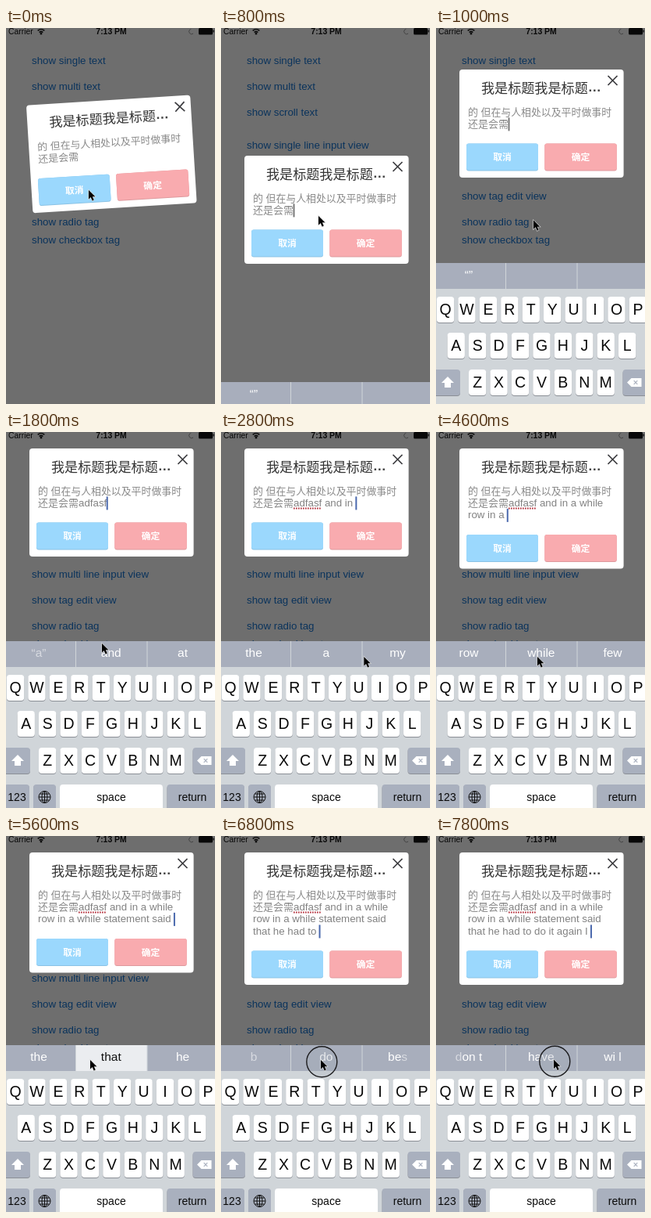
These frames come from a looping animation (268x480 px, 8 s). An HTML page with a canvas:

```html
<!DOCTYPE html>
<html lang="en">
<head>
<meta charset="utf-8">
<style>
html, body { margin: 0; width: 100%; height: 100%; overflow: hidden; background: #6e6e6e; }
canvas { display: block; width: 100vw; height: 100vh; }
</style>
</head>
<body>
<canvas id="stage" width="268" height="480"></canvas>
<script>
const ctx = document.getElementById("stage").getContext("2d");
const LATIN = '"Liberation Sans", Arial, sans-serif';
const CJK = '"Noto Sans CJK SC", "Noto Sans CJK", sans-serif';
const LOOP = 8000, TICK = 200;

const menu = [
  [42, "show single text"], [75, "show multi text"], [108, "show scroll text"],
  [150, "show single line input view"], [182.5, "show multi line input view"],
  [215, "show tag edit view"], [248, "show radio tag"], [271, "show checkbox tag"]
];

// time, text added, suggestions (dim|bright|dim), pressed cell, tap ring
const script = [
  [0, "", "“”//"],
  [1600, "ad", "“a”/and/at"],
  [1800, "fasf", "“a”|/and/at"],
  [2000, " ", "I/and/the"],
  [2200, "", "I/and/the", 1, true],
  [2400, "and ", "the/I/in"],
  [2600, "", "the/I/in", 2, true],
  [2800, "in ", "the/a/my"],
  [3200, "", "the/a/my", 1, true],
  [3400, "a ", "few/while/row"],
  [3600, "", "st|ateen|t/while/r|oy|"],
  [3800, "while ", "and/I/row"],
  [4000, "row ", "and/in/of"],
  [4200, "", "and/in/of", 1, true],
  [4400, "in ", "the/a/my"],
  [4600, "a ", "row/while/few"],
  [4800, "while ", "statement/and/I"],
  [5000, "", "statement/and/I", 0],
  [5200, "statement ", "said/that/is"],
  [5400, "said ", "the/that/he"],
  [5600, "", "the/that/he", 1],
  [5800, "that ", "the/he/I"],
  [6000, "he ", "is/had/was"],
  [6200, "", "is/had/was", -1, true],
  [6400, "had ", "a/to/been"],
  [6600, "to ", "b/do/be"],
  [6800, "", "b|/do/|be|s", -1, true],
  [7000, "do ", "it/it/so"],
  [7200, "it ", "to/again/and"],
  [7400, "again ", "and/I/the"],
  [7600, "I ", "don’t/have/will"],
  [7800, "", "d|on t|/have/wi l", -1, true]
];

const keys = {
  pointer: [[0, 106, 207], [800, 125, 240], [1400, 125, 256], [1800, 123, 270], [2200, 131, 285],
    [2600, 200, 287], [3200, 150, 287], [3600, 178, 288], [4000, 160, 287], [4600, 130, 287],
    [5000, 60, 287], [5600, 108, 286], [6200, 130, 286], [6800, 128, 286], [7800, 151, 285.5]],
  // centre height and tilt of the two-line dialog
  dialog: [[0, 161, -3.55], [200, 216, -.8], [400, 232, 0], [800, 232, 0], [1000, 122, 0], [1200, 90, 0]],
  keyboard: [[0, 484], [600, 484], [800, 452], [1000, 300], [1200, 267]]
};

function sample(track, t) {
  const i = track.findIndex(k => k[0] > t);
  if (i < 0) return track[track.length - 1].slice(1);
  const a = track[i - 1], b = track[i], p = (t - a[0]) / (b[0] - a[0]);
  return a.slice(1).map((v, n) => v + (b[n + 1] - v) * p);
}

function text(str, x, y, size, color, align = "left", font = LATIN, weight = "") {
  ctx.font = `${weight} ${size}px ${font}`;
  ctx.textAlign = align;
  ctx.textBaseline = "middle";
  ctx.fillStyle = color;
  ctx.fillText(str, x, y);
  return ctx.measureText(str).width;
}

function box(x, y, w, h, r, color) {
  ctx.fillStyle = color;
  ctx.beginPath();
  ctx.roundRect(x, y, w, h, r);
  ctx.fill();
}

function line(points, color, width, closed) {
  ctx.beginPath();
  points.forEach(p => ctx.lineTo(...p));
  if (closed) ctx.closePath();
  ctx.strokeStyle = color;
  ctx.lineWidth = width;
  ctx.stroke();
}

function polygon(points, color) {
  ctx.beginPath();
  points.forEach(p => ctx.lineTo(...p));
  ctx.fillStyle = color;
  ctx.fill();
}

function cross(x, y, r, color, width) {
  line([[x - r, y - r], [x + r, y + r]], color, width);
  line([[x + r, y - r], [x - r, y + r]], color, width);
}

function arc(x, y, r, from = 0, to = Math.PI * 2) {
  ctx.beginPath();
  ctx.arc(x, y, r, from, to);
}

function drawStatusBar() {
  const ink = "#080808";
  text("Carrier", 3, 5.2, 10.4, ink);
  text("7:13 PM", 135, 5.2, 10.4, ink, "center", LATIN, "bold");
  ctx.strokeStyle = ink;
  ctx.lineWidth = 1.6;
  for (const r of [3.5, 6.5]) { arc(45, 8.2, r, -2.3, -.84); ctx.stroke(); }
  ctx.fillStyle = ink;
  arc(45, 7.2, 1.3);
  ctx.fill();
  ctx.strokeStyle = "#444";
  ctx.lineWidth = 1;
  arc(238, 4.5, 3.3, .9, 4.5);
  ctx.stroke();
  box(247, 0, 18, 8.5, 1.5, ink);
  box(265.5, 2.5, 1.3, 3, .5, ink);
}

function layoutWords(typed) {
  const words = typed.match(/\S+\s*/g) || [];
  const placed = [];
  let x = 63, row = 1;
  ctx.font = `13.3px ${LATIN}`;
  for (const word of words) {
    if (x + ctx.measureText(word.trim()).width > 196) { x = 11; row++; }
    placed.push({ word, x, row });
    x += ctx.measureText(word).width;
  }
  return { placed, x, row };
}

function drawButton(x, y, w, color, edge, label) {
  box(x, y, w, 35, 3, edge);
  box(x, y, w, 34, 3, color);
  text(label, x + w / 2, y + 17.5, 11.8, "#fff", "center", CJK, "bold");
}

function drawDialog(t, typed) {
  const [cy, tilt] = sample(keys.dialog, t);
  const { placed, x, row } = layoutWords(typed);
  const extra = (row - 1) * 15.5;
  const lineY = n => 54.4 + n * 15.5;
  ctx.save();
  ctx.translate(135, cy);
  ctx.rotate(tilt * Math.PI / 180);
  ctx.translate(-105, -69);
  box(0, 0, 210.6, 138 + extra, 4, "#fff");

  const width = text("我是标题我是标题", 28, 23.2, 17.1, "#333", "left", CJK);
  text("…", 28 + width, 23.2, 17.1, "#444", "left", LATIN, "bold");
  cross(196.5, 14, 6, "#3c3c40", 1.7);

  const gray = "#8a8a8a";
  text("的", 11, lineY(0) - .5, 13, gray, "left", CJK);
  text("但在与人相处以及平时做事时", 27.5, lineY(0) - .5, 12.9, gray, "left", CJK);
  text("还是会需", 11, lineY(1) - .5, 13, gray, "left", CJK);
  for (const p of placed) text(p.word, p.x, lineY(p.row), 13.3, "#828282");
  if (typed.includes(" ")) {
    ctx.setLineDash([1.7, 1.3]);
    line([[63, 76.5], [99, 76.5]], "#b5323e", 2);
    ctx.setLineDash([]);
  }
  if (t >= 600) box(x - .5, lineY(row) - 8.5, 2, 17, 0, typed ? "#4a68ad" : "#777");

  drawButton(9, 94.4 + extra, 92, "#9bd8fd", "#8bc3e5", "取消");
  drawButton(109.3, 94.4 + extra, 92.5, "#f9abaf", "#dd9a9e", "确定");
  ctx.restore();
}

function drawKey(x, y, w, label, size, color = "#fff") {
  box(x, y + 1, w, 33, 4, "#8b8f96");
  box(x, y, w, 33, 4, color);
  text(label, x + w / 2, y + 17.2, size, "#0a0a0a", "center");
}

function drawSuggestion(spec, index, pressed) {
  const left = [0, 90, 181.5][index], width = [89, 91, 87][index];
  if (pressed) box(left, 0, width, 33, 0, "#ebedf0");
  const parts = spec.split("|");
  ctx.font = `15.5px ${LATIN}`;
  let x = [42, 134.8, 226.5][index] - ctx.measureText(parts.join("")).width / 2;
  parts.forEach((part, n) => {
    const dim = parts.length === 3 ? n !== 1 : parts.length === 2;
    const color = pressed ? "#111" : dim ? "rgba(255,255,255,.55)" : "#fff";
    x += text(part, x, 15.7, 15.5, color, "left");
  });
}

function drawKeyboard(top, suggestions, pressed) {
  const dark = "#a9b0be";
  ctx.save();
  ctx.translate(0, top);
  box(0, 0, 268, 220, 0, "#d0d5d9");
  box(0, 0, 268, 33, 0, "#a8aebc");
  suggestions.split("/").forEach((s, i) => drawSuggestion(s, i, i === pressed));
  for (const x of [89, 180.5]) box(x, 0, 1, 33, 0, "#d0d5d9");

  [["QWERTYUIOP", .9, 43], ["ASDFGHJKL", 14.6, 89], ["ZXCVBNM", 42, 136]].forEach(([letters, x, y]) =>
    [...letters].forEach((c, i) => drawKey(x + i * 27.43, y, 22.3, c, 19.5)));

  drawKey(-5, 136, 36, "", 1, dark);
  polygon([[15, 145], [23, 153], [19, 153], [19, 159], [11, 159], [11, 153], [7, 153]], "#fff");

  drawKey(239.5, 136, 36, "", 1, dark);
  polygon([[245, 152.5], [250.5, 147], [263.5, 147], [263.5, 158], [250.5, 158]], "#fff");
  cross(256, 152.5, 2.3, dark, 1.2);

  drawKey(-2, 183, 32, "123", 14, dark);
  drawKey(35, 183, 29, "", 1, dark);
  ctx.strokeStyle = "#111";
  ctx.lineWidth = 1;
  for (const rx of [7.5, 3.5]) {
    ctx.beginPath();
    ctx.ellipse(49.5, 199, rx, 7.5, 0, 0, Math.PI * 2);
    ctx.stroke();
  }
  line([[49.5, 191.5], [49.5, 206.5]], "#111", 1);
  for (const [y, w] of [[195, 6], [199, 7.5], [203, 6]]) line([[49.5 - w, y], [49.5 + w, y]], "#111", 1);
  drawKey(69, 183, 132, "space", 14);
  drawKey(206.5, 183, 65, "return", 14, dark);
  ctx.restore();
}

function drawPointer(t, tapping) {
  const [x, y] = sample(keys.pointer, t);
  ctx.save();
  ctx.translate(x, y);
  if (tapping) {
    arc(1.3, 2.3, 19.5);
    ctx.fillStyle = "rgba(160,166,178,.25)";
    ctx.fill();
    ctx.strokeStyle = "#1c1c1e";
    ctx.lineWidth = 1.4;
    ctx.stroke();
  }
  const arrow = [[0, 0], [0, 11.5], [2.7, 9], [4.7, 13.5], [6.7, 12.6], [4.8, 8.3], [8.3, 8.3]];
  line(arrow, "#ddd", 1.2, true);
  polygon(arrow, "#000");
  ctx.restore();
}

function draw(t) {
  const past = script.filter(s => s[0] <= t);
  const typed = past.map(s => s[1]).join("");
  const [, , suggestions, pressed, tapping] = past[past.length - 1];
  box(0, 0, 268, 480, 0, "#6e6e6e");
  drawStatusBar();
  for (const [y, label] of menu) text(label, 33, y, 13.3, "#0a335c");
  drawDialog(t, typed);
  drawKeyboard(sample(keys.keyboard, t)[0], suggestions, pressed);
  drawPointer(t, tapping);
}

function frame() {
  draw(Math.floor(performance.now() % LOOP / TICK) * TICK);
  requestAnimationFrame(frame);
}
frame();
</script>
</body>
</html>
```
